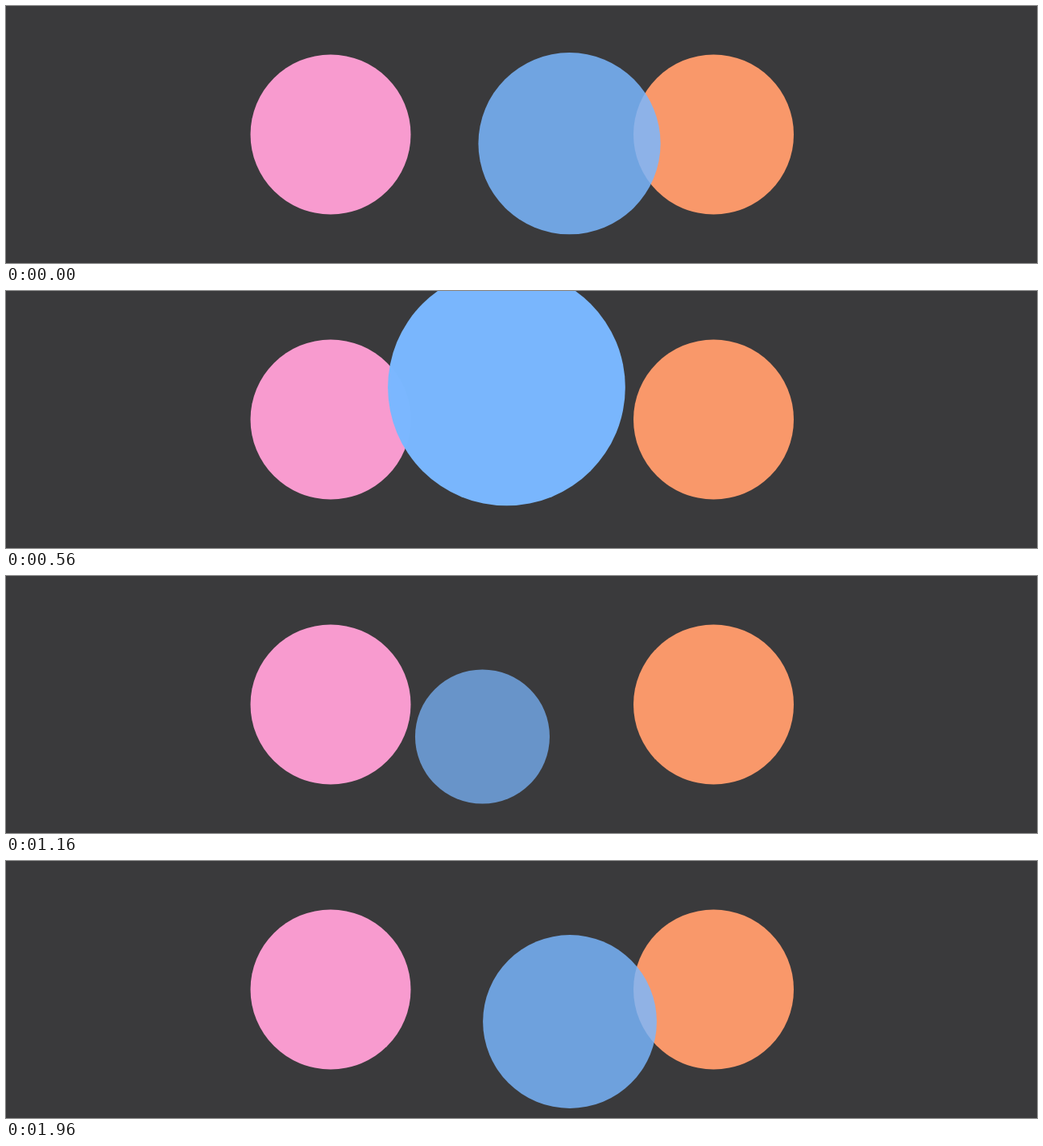
An HTML page for the animation above (2 s loop, 1280 by 320 pixels).

```html
<!DOCTYPE html>
<html lang="en">
<head>
<meta charset="utf-8">
<title>Bouncing circle</title>
<style>
  html, body { margin: 0; width: 100%; height: 100%; overflow: hidden; background: #3a3a3c; }
  svg { display: block; width: 100%; height: 100%; }
</style>
</head>
<body>
<svg viewBox="0 0 1280 320">
  <circle cx="403" cy="160" r="99.5" fill="#f89bcf"/>
  <circle cx="878.5" cy="160" r="99.5" fill="#f9986a"/>
  <circle id="ball" fill="#7ab8ff"/>
</svg>
<script>
  const LOOP = 2000, STEP = 40, BOUNCE = 400;
  const ball = document.getElementById('ball');

  function draw(ms) {
    const t = ms + STEP;
    const angle = 2 * Math.PI * t / LOOP;
    const depth = Math.sin(angle);
    const u = t % BOUNCE / BOUNCE;
    ball.setAttribute('cx', 640 + 60 * Math.cos(angle));
    ball.setAttribute('cy', 200 - 320 * u * (1 - u));
    ball.setAttribute('r', 83 * (1.3 + 0.5 * depth));
    ball.setAttribute('fill-opacity', 0.825 + 0.175 * depth);
  }

  // The motion advances in 40 ms steps; the small lead absorbs timer rounding.
  function tick(now) {
    draw(Math.floor((now + 4) / STEP) * STEP % LOOP);
    requestAnimationFrame(tick);
  }

  draw(0);
  requestAnimationFrame(tick);
</script>
</body>
</html>
```
